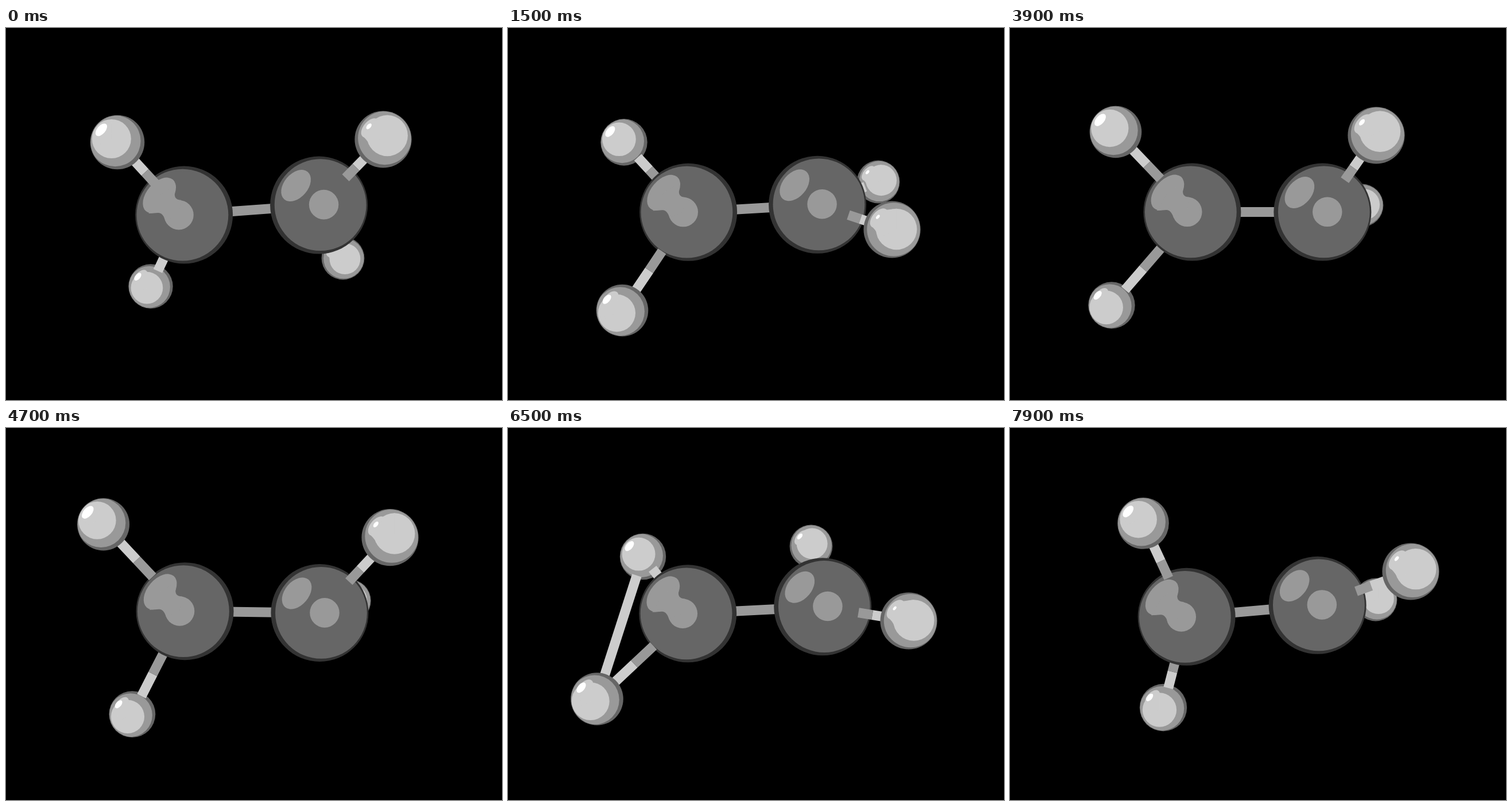
Write an HTML page with a canvas that moves like this. It is 864x648 px and loops after 8 s.

```html
<!DOCTYPE html>
<html lang="en">
<head>
<meta charset="utf-8">
<title>Vibrating molecule</title>
<style>
  html, body { margin: 0; width: 100%; height: 100%; overflow: hidden; background: #000; }
  canvas { display: block; }
</style>
</head>
<body>
<canvas id="stage" width="864" height="648"></canvas>
<script>
const ctx = document.getElementById('stage').getContext('2d');
const LOOP = 8000, STEP = 100;
const MID = { x: 432, y: 324 };
const C_RADIUS = 85, H_RADIUS = 43, FRONT_RADIUS = 49.6, BACK_RADIUS = 37.4;
const C_MASS = 12, MOMENT = { x: 11953, y: 8853 };
const VIEW = 1000, BOND_LIMIT = 300, BOND_WIDTH = 17;
const TILT = Math.atan2(-0.76, 0.65);

// Turning points of the swing; carbons and radii follow from rules
const TIMES = [0, 1500, 2800, 3900, 5500, 6500, 7900];
const KEYS = {
  topLeft: { x: [194, 202, 241, 184, 173, 235, 232], y: [199, 199, 175, 181, 163, 224, 166] },
  lowLeft: { x: [252, 199, 187, 177, 250, 155, 267], y: [450, 492, 470, 483, 507, 472, 487] },
  front: { x: [657, 669, 653, 638, 702, 698, 698], y: [194, 351, 354, 187, 235, 336, 250] },
  back: { x: [587, 645, 621, 613, 577, 528, 637], y: [401, 268, 229, 309, 271, 206, 299] },
  axis: { x: [235, 225, 244, 227, 244, 235, 228], y: [-17, -13, -17, 0, 1, -12, -20] }
};
const LEAN = [4.3, -2.3, -4, 2.3, 1.3, -2.8, 1.8];

// Cubic interpolation with finite-difference slopes
function spline(v, t) {
  const last = TIMES.length - 1;
  let i = 0;
  while (i < last - 1 && t >= TIMES[i + 1]) i++;
  const span = TIMES[i + 1] - TIMES[i];
  const u = Math.min(1, (t - TIMES[i]) / span), u2 = u * u, u3 = u2 * u;
  const slope = k => {
    const a = Math.max(0, k - 1), b = Math.min(last, k + 1);
    return (v[b] - v[a]) / (TIMES[b] - TIMES[a]) * span;
  };
  return (2 * u3 - 3 * u2 + 1) * v[i] + (u3 - 2 * u2 + u) * slope(i) +
         (3 * u2 - 2 * u3) * v[i + 1] + (u3 - u2) * slope(i + 1);
}

function atom(name, t, r) {
  return { x: spline(KEYS[name].x, t), y: spline(KEYS[name].y, t), r };
}

// The centre of mass stays put, so the hydrogens place the carbons
function carbons(hydrogens, t) {
  const axis = atom('axis', t);
  const place = side => {
    const c = { r: C_RADIUS };
    for (const k of ['x', 'y']) {
      const sum = hydrogens.reduce((s, h) => s + h[k], 0);
      c[k] = ((MOMENT[k] - sum) / C_MASS + side * axis[k]) / 2;
    }
    return c;
  };
  return [place(-1), place(1)];
}

function oval(color, x, y, a, b = a) {
  ctx.fillStyle = color;
  ctx.beginPath();
  ctx.ellipse(x, y, a, b, a === b ? 0 : TILT, 0, 2 * Math.PI);
  ctx.fill();
}

// Draws its shading in units of the radius, clipped to the ball
function ball(s, rim, shade) {
  oval(rim, s.x, s.y, s.r);
  ctx.save();
  ctx.beginPath();
  ctx.arc(s.x, s.y, s.r - 0.8, 0, 2 * Math.PI);
  ctx.clip();
  ctx.translate(s.x, s.y);
  ctx.scale(s.r, s.r);
  shade(s.x - MID.x, s.y - MID.y);
  ctx.restore();
}

function carbon(s, joined) {
  ball(s, '#333', (dx, dy) => {
    oval('#666', dx * 0.00026, dy * 0.00026, 0.94);
    oval('#999', dx * 0.00088, dy * 0.0007, 0.303);
    if (!joined) {
      oval('#999', -0.47, -0.4, 0.37, 0.245);
      return;
    }
    oval('#999', -0.505, -0.4, 0.425, 0.26);
    ctx.beginPath();
    ctx.moveTo(-0.726, -0.03);
    ctx.bezierCurveTo(-0.52, -0.03, -0.464, -0.1, -0.38, 0.113);
    ctx.lineTo(-0.107, 0);
    ctx.lineTo(-0.06, -0.304);
    ctx.bezierCurveTo(-0.226, -0.315, -0.2, -0.42, -0.167, -0.61);
    ctx.lineTo(-0.505, -0.4);
    ctx.fill();
  });
}

function hydrogen(s) {
  ball(s, '#666', (dx, dy) => {
    const ox = dx * 0.00078 - 0.03, oy = dy * 0.00078 - 0.03;
    oval('#999', ox * 0.38, oy * 0.38, 0.94);
    oval('#ccc', ox, oy, 0.72);
    oval('#ccc', -0.46, -0.4, 0.4, 0.23);
    ctx.beginPath();
    ctx.moveTo(-0.21, -0.69);
    ctx.lineTo(ox, oy - 0.72);
    ctx.lineTo(ox, oy);
    ctx.lineTo(ox - 0.64, oy + 0.33);
    ctx.quadraticCurveTo(-0.5, 0.1, -0.68, -0.08);
    ctx.fill();
    const len = 0.17 - dx * 0.00033 - dy * 0.0002;
    oval('#fff', dx * 0.0002 - 0.545, dy * 0.0001 - 0.445, len, len * 0.56);
  });
}

function rod(a, b, from, to, color) {
  const px = u => a.x + (b.x - a.x) * u, py = u => a.y + (b.y - a.y) * u;
  ctx.strokeStyle = color;
  ctx.lineWidth = BOND_WIDTH;
  ctx.beginPath();
  ctx.moveTo(px(from), py(from));
  ctx.lineTo(px(to), py(to));
  ctx.stroke();
}

// Reaches at least to the outline of both balls
function bond(c, h) {
  const d = Math.hypot(h.x - c.x, h.y - c.y);
  const start = Math.min(0.415, (c.r - 3) / d);
  const end = Math.max(0.785, 1 - (h.r - 5) / d);
  const split = 0.6 - (h.r - H_RADIUS) * 0.0035;
  rod(c, h, start, split, '#999');
  rod(c, h, split, end, '#ccc');
}

// Undo the perspective, taking depth from the apparent radius
function space(h) {
  const k = H_RADIUS / h.r;
  return [(h.x - MID.x) * k, (h.y - MID.y) * k, VIEW * (1 - k)];
}

function gap(a, b) {
  const p = space(a), q = space(b);
  return Math.hypot(p[0] - q[0], p[1] - q[1], p[2] - q[2]);
}

function draw(t) {
  const lean = spline(LEAN, t);
  const a = atom('topLeft', t, H_RADIUS + lean);
  const b = atom('lowLeft', t, H_RADIUS - lean);
  const near = atom('front', t, FRONT_RADIUS), far = atom('back', t, BACK_RADIUS);
  const [c1, c2] = carbons([a, b, near, far], t);
  const pairs = [[c1, a], [c1, b], [c2, near], [c2, far]];
  pairs.sort((m, n) => m[1].r - n[1].r);

  ctx.fillStyle = '#000';
  ctx.fillRect(0, 0, 864, 648);
  for (const [c, h] of pairs) {
    if (h.r >= H_RADIUS) continue;
    hydrogen(h);
    bond(c, h);
  }
  if (gap(a, b) < BOND_LIMIT) rod(a, b, 0.133, 0.86, '#ccc');
  rod(c1, c2, 0.3, 0.7, '#999');
  carbon(c1, true);
  carbon(c2, false);
  for (const [c, h] of pairs) {
    if (h.r < H_RADIUS) continue;
    bond(c, h);
    hydrogen(h);
  }
}

function tick() {
  draw(Math.floor(performance.now() % LOOP / STEP) * STEP);
  requestAnimationFrame(tick);
}
tick();
</script>
</body>
</html>
```
